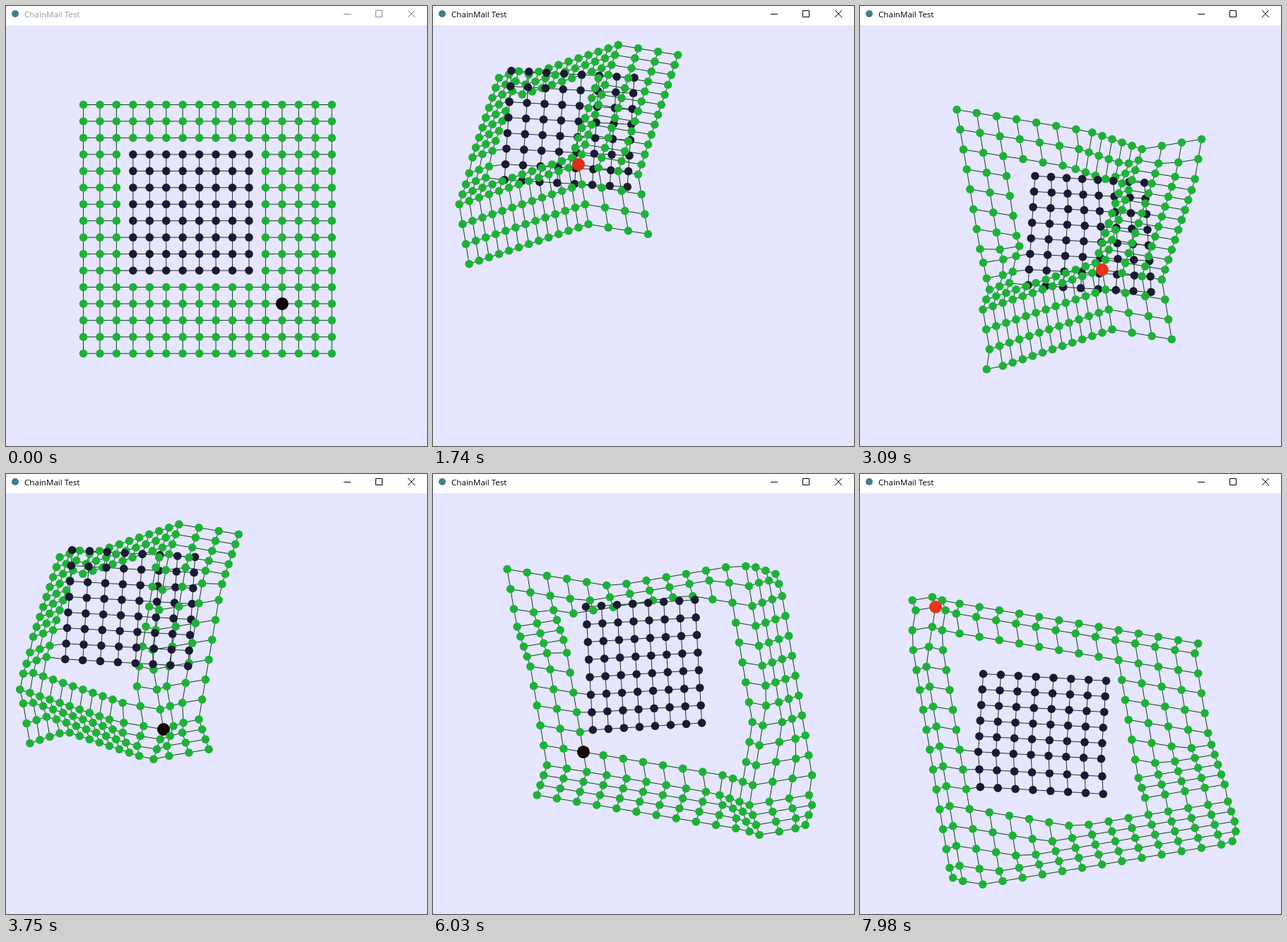
Recreate the animation shown at these times as an HTML page with a canvas. Size 596 px wide and 622 px high, loop 8 s.

```html
<!DOCTYPE html>
<html lang="en">
<head>
<meta charset="utf-8">
<title>ChainMail Test</title>
<style>
  html, body { margin: 0; width: 100%; height: 100%; overflow: hidden; background: #e6e6ff; }
  canvas { display: block; }
</style>
</head>
<body>
<canvas id="stage" width="596" height="622"></canvas>
<script>
const ctx = document.getElementById('stage').getContext('2d');
const LOOP = 8000, STEP = 30, BLINK = 1225, ACTIVATE = 870;
const N = 16, GAP = 23.45, ORIGIN = [109.5, 139.5];

// Chain limits as fractions of the rest spacing
const SOFT = { min: 0.6, max: 1.2, shear: 0.2, color: '#1ab333' };
const STIFF = { min: 0.94, max: 1.06, shear: 0.06, color: '#1a1a33' };

const id = (col, row) => row * N + col;
const inCore = (col, row) => col > 2 && col < 11 && row > 2 && row < 11;

const nodes = [];
for (let row = 0; row < N; row++)
  for (let col = 0; col < N; col++)
    nodes.push({ col, row, material: inCore(col, row) ? STIFF : SOFT, pos: [0, 0] });

const links = [];
function link(a, b, axis) {
  const p = nodes[a], q = nodes[b];
  // The core hangs on the outer mesh only by three links on its left side
  const bridge = axis === 0 && p.col === 2 && p.row >= 8;
  if (p.material !== q.material && !bridge) return;
  const mean = key => GAP * (p.material[key] + q.material[key]) / 2;
  const along = [mean('min'), mean('max')], across = [-mean('shear'), mean('shear')];
  links.push({ a, b, range: axis === 0 ? [along, across] : [across, along] });
}
for (const { col, row } of nodes) {
  if (col < N - 1) link(id(col, row), id(col + 1, row), 0);
  if (row < N - 1) link(id(col, row), id(col, row + 1), 1);
}

// Reach of every node relative to a held one: shortest paths over the link limits
function reachFrom(held, axis) {
  const lo = nodes.map(() => -Infinity), hi = nodes.map(() => Infinity);
  lo[held] = hi[held] = 0;
  let changed = true;
  const relax = (from, to, min, max) => {
    if (lo[from] + min > lo[to] + 1e-6) { lo[to] = lo[from] + min; changed = true; }
    if (hi[from] + max < hi[to] - 1e-6) { hi[to] = hi[from] + max; changed = true; }
  };
  while (changed) {
    changed = false;
    for (const { a, b, range } of links) {
      const [min, max] = range[axis];
      relax(a, b, min, max);
      relax(b, a, -max, -min);
    }
  }
  return { lo, hi };
}

// Pointer paths as [time, x, y]
const drags = [
  { held: id(12, 12), path: [
    [930, 390.9, 420.9], [1740, 206, 224], [1860, 187, 195], [2460, 418, 429],
    [2520, 437, 448], [2760, 531, 540], [3270, 225, 270], [3390, 188.6, 240],
    [3750, 223, 361], [4080, 300, 525], [4110, 307, 528], [4350, 362, 441],
    [4740, 499, 296], [5310, 448, 468]] },
  { held: id(1, 1), path: [
    [6900, 138, 167], [7320, 105, 299], [7530, 90, 378], [7710, 80, 310], [7980, 107, 188]] }
];
for (const drag of drags) drag.reach = [reachFrom(drag.held, 0), reachFrom(drag.held, 1)];

// Smooth interpolation that never overshoots its points
function along(path, t, k) {
  const slope = i => path[i + 1] && path[i]
    ? (path[i + 1][k] - path[i][k]) / (path[i + 1][0] - path[i][0]) : 0;
  const tangent = i => {
    const a = slope(i - 1), b = slope(i);
    return a * b > 0 ? 2 * a * b / (a + b) : 0;
  };
  let i = 0;
  while (i < path.length - 2 && t > path[i + 1][0]) i++;
  const span = path[i + 1][0] - path[i][0], u = (t - path[i][0]) / span, v = 1 - u;
  return path[i][k] * (1 + 2 * u) * v * v + path[i + 1][k] * (3 - 2 * u) * u * u
    + span * u * v * (tangent(i) * v - tangent(i + 1) * u);
}

function reset() {
  for (const n of nodes) n.pos = [ORIGIN[0] + n.col * GAP, ORIGIN[1] + n.row * GAP];
}

function advance(t) {
  for (const { path, reach } of drags) {
    if (t < path[0][0] || t > path[path.length - 1][0]) continue;
    for (let k = 0; k < 2; k++) {
      const p = along(path, t, k + 1), { lo, hi } = reach[k];
      nodes.forEach((n, i) => {
        n.pos[k] = Math.min(Math.max(n.pos[k], p + lo[i]), p + hi[i]);
      });
    }
  }
}

const selections = [[0, id(12, 12)], [5550, id(6, 12)], [5850, id(2, 11)], [6330, id(1, 1)]];

function disc([x, y], radius, color) {
  ctx.fillStyle = color;
  ctx.beginPath();
  ctx.arc(x, y, radius, 0, 2 * Math.PI);
  ctx.fill();
}

function drawMesh(t) {
  ctx.strokeStyle = '#103c20';
  ctx.lineWidth = 1;
  ctx.beginPath();
  for (const { a, b } of links) {
    ctx.moveTo(...nodes[a].pos);
    ctx.lineTo(...nodes[b].pos);
  }
  ctx.stroke();

  const selected = selections.filter(s => s[0] <= t).pop()[1];
  const glow = Math.sin(Math.PI * t / BLINK) ** 2;
  const pulse = `rgb(${10 + 225 * glow}, ${50 * glow}, ${26 * glow})`;
  nodes.forEach((n, i) => i === selected
    ? disc(n.pos, 9, pulse)
    : disc(n.pos, 5.8, n.material.color));
}

function drawTitleBar(active) {
  ctx.fillStyle = '#fff';
  ctx.fillRect(0, 0, 596, 27);
  disc([13, 11], 5, '#3f7f8c');
  ctx.fillStyle = active ? '#000' : '#999';
  ctx.font = '11.6px "Open Sans", "Noto Sans", sans-serif';
  ctx.fillText('ChainMail Test', 26, 16);
  ctx.strokeStyle = active ? '#000' : '#888';
  ctx.beginPath();
  ctx.moveTo(478, 11.5);
  ctx.lineTo(488, 11.5);
  ctx.rect(523.5, 6.5, 9, 9);
  ctx.moveTo(569, 6);
  ctx.lineTo(579, 16);
  ctx.moveTo(579, 6);
  ctx.lineTo(569, 16);
  ctx.stroke();
}

let done = Infinity;
function frame() {
  const step = Math.floor(performance.now() % LOOP / STEP);
  if (step < done) {
    reset();
    done = 0;
  }
  while (done < step) advance(++done * STEP);

  const t = step * STEP;
  ctx.fillStyle = '#e6e6ff';
  ctx.fillRect(0, 0, 596, 622);
  drawMesh(t);
  drawTitleBar(t >= ACTIVATE);
  requestAnimationFrame(frame);
}
frame();
</script>
</body>
</html>
```
